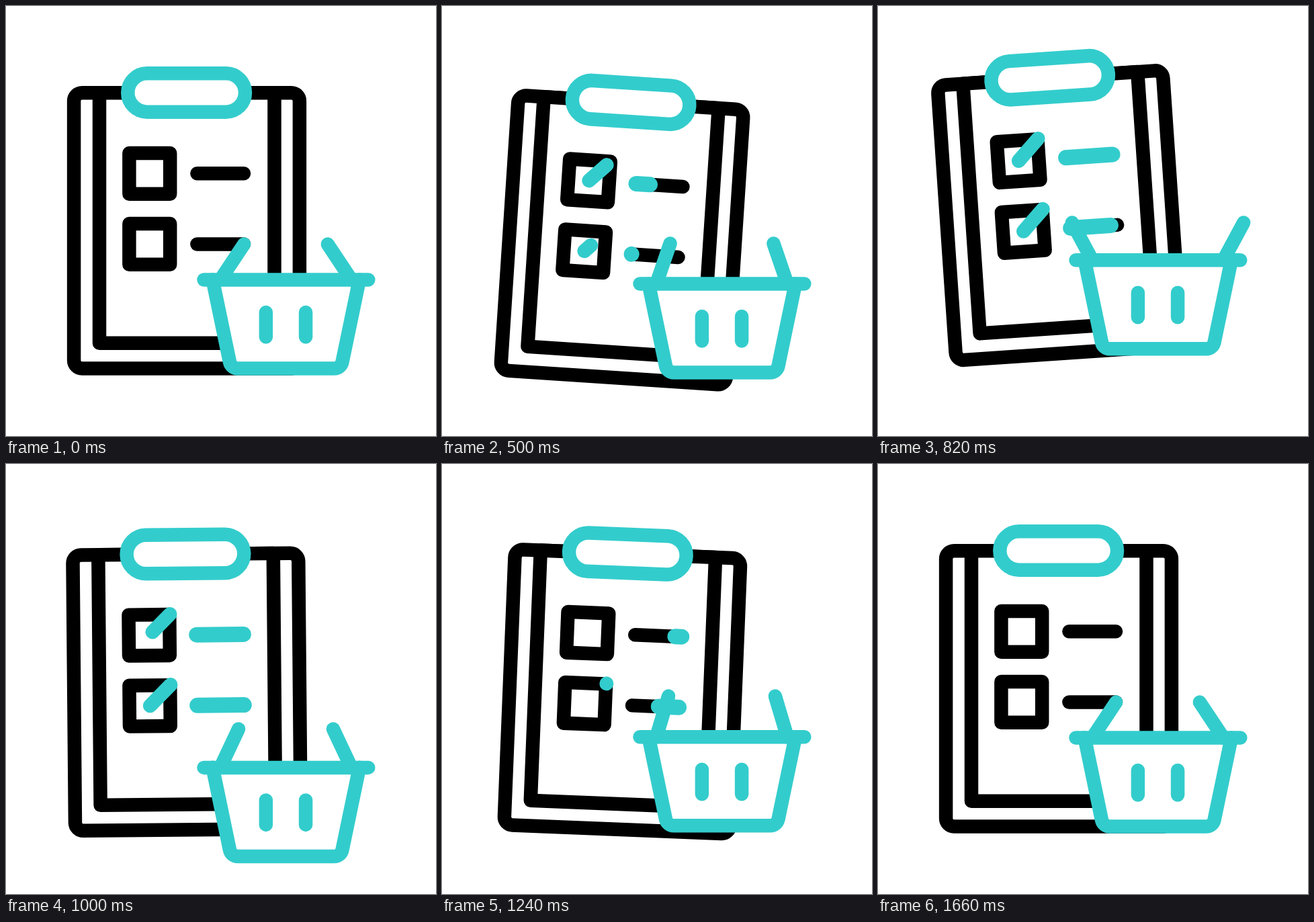
These frames come from a looping animation (640x640 px, 2.2 s). An HTML page with a canvas:

```html
<!DOCTYPE html>
<html>
<head>
<meta charset="utf-8">
<style>
html, body { margin: 0; width: 100%; height: 100%; overflow: hidden; background: #fff }
canvas { display: block; width: 640px; height: 640px }
</style>
</head>
<body>
<canvas id="stage" width="640" height="640"></canvas>
<script>
const LOOP = 2200, TEAL = '#3cc', BLACK = '#000', WEIGHT = 20.5;
const ctx = document.getElementById('stage').getContext('2d');

const rad = deg => deg * Math.PI / 180;
const mix = (a, b, k) => a + (b - a) * k;

function ease(t, start, length) {
  const u = Math.min(1, Math.max(0, (t - start) / length));
  return u * u * (3 - 2 * u);
}

// Leave rest, turn at each height one step apart, settle back to rest.
function sway(t, start, peak, step, ...heights) {
  const times = [start, peak, peak + step, peak + 2 * step, 1370, 1660];
  const values = [0, ...heights, 0];
  return values.reduce((v, end, i) => i
    ? v + (end - values[i - 1]) * ease(t, times[i - 1], times[i] - times[i - 1])
    : end, 0);
}

function stroke(color, weight) {
  ctx.strokeStyle = color;
  ctx.lineWidth = weight;
  ctx.stroke();
}

function line(color, x1, y1, x2, y2, weight = WEIGHT) {
  ctx.beginPath();
  ctx.moveTo(x1, y1);
  ctx.lineTo(x2, y2);
  stroke(color, weight);
}

function box(color, x, y, w, h, r) {
  ctx.beginPath();
  if (r) ctx.roundRect(x, y, w, h, r);
  else ctx.rect(x, y, w, h);
  ctx.fill();
  stroke(color, WEIGHT);
}

// A teal line that grows from its first end, then wipes off the same way.
function mark(t, on, off, x1, y1, x2, y2, weight) {
  const head = ease(t, on, 420), tail = ease(t, off, 250);
  if (head <= tail) return;
  line(TEAL, mix(x1, x2, tail), mix(y1, y2, tail), mix(x1, x2, head), mix(y1, y2, head), weight);
}

function drawRow(t, row) {
  const y = 249.3 + 105.1 * row, on = 200 + 150 * row, off = 940 + 55 * row;
  box(BLACK, 183.4, y - 30.4, 60.8, 60.8);
  line(BLACK, 284.4, y, 354, y);
  mark(t, on, off, 214, y, 245, y - 31, 21);
  mark(t, on + 150, off + 110, 284.4, y, 354, y, 23);
}

function drawBoard(t) {
  ctx.save();
  ctx.translate(269, 320 + sway(t, 210, 445, 340, 17, -24, 17.5, -11));
  ctx.rotate(rad(sway(t, 275, 532, 320, 3.9, -4.1, 3.9, -1.8)));
  ctx.translate(-269, -320);
  box(BLACK, 101.1, 129.2, 335.8, 410.3, 12);
  box(BLACK, 139, 129.2, 260.5, 372.5);
  box(TEAL, 181.3, 100.3, 174.7, 57.4, 28.7);
  drawRow(t, 0);
  drawRow(t, 1);
  ctx.restore();
}

function drawBasket(t) {
  const swing = sway(t, 210, 355, 380, 15, -75, 10, -45);
  const angle = rad(33.6 + Math.max(-62, swing)); // handles stop when fully open
  const dx = 63.5 * Math.sin(angle), dy = 63.5 * Math.cos(angle);
  ctx.save();
  ctx.translate(416.5, 407.5 + sway(t, 210, 358, 340, 48, -62, 48, -26));
  ctx.beginPath();
  ctx.moveTo(-109, 0);
  ctx.arcTo(-81.5, 132, 0, 132, 12);
  ctx.arcTo(82, 132, 109.5, 0, 12);
  ctx.lineTo(109.5, 0);
  ctx.fill();
  stroke(TEAL, WEIGHT);
  for (const side of [-1, 1]) {
    line(TEAL, side * 97.5, 0, side * (97.5 - dx), -dy);
    line(TEAL, side * 29.6, 48.5, side * 29.6, 85);
  }
  line(TEAL, -122, 0, 122.8, 0);
  ctx.restore();
}

function draw(t) {
  ctx.fillStyle = '#fff';
  ctx.fillRect(0, 0, 640, 640);
  ctx.lineCap = ctx.lineJoin = 'round';
  drawBoard(t);
  drawBasket(t);
}

const start = performance.now();
function tick() {
  draw((performance.now() - start) % LOOP);
  requestAnimationFrame(tick);
}
tick();
</script>
</body>
</html>
```
